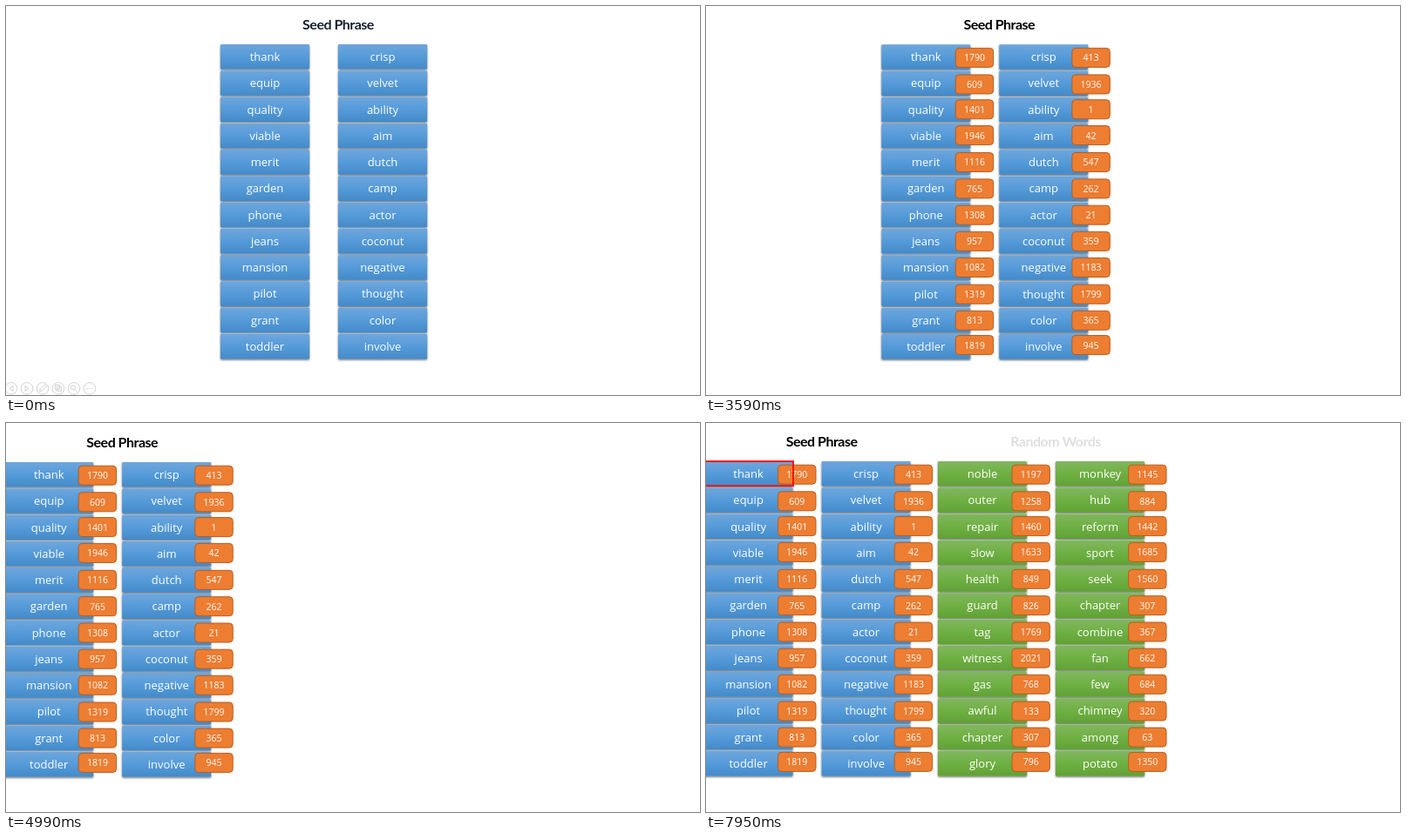
These frames come from a looping animation (796 by 447 pixels, 8000 ms). An HTML page:

```html
<!DOCTYPE html>
<html lang="en">
<head>
<meta charset="utf-8">
<title>Seed Phrase</title>
<style>
  html, body { margin: 0; width: 100%; height: 100%; overflow: hidden; background: #fff; }
  svg { display: block; width: 796px; height: 447px; }
  text { text-anchor: middle; fill: #fff; }
  .word { font: 13px "Open Sans", "Noto Sans", sans-serif; }
  .num { font: 10.5px "Open Sans", "Noto Sans", sans-serif; }
  .title { font: 700 16px Lato, "Open Sans", sans-serif; letter-spacing: -.5px; fill: #000; }
  .badge rect { fill: #ed7d31; stroke: #b85c1c; }
  #controls { fill: none; stroke: #d2d2d2; }
  #mark { fill: none; stroke: #f00; stroke-width: 2; }
</style>
</head>
<body>
<svg viewBox="0 0 796 447">
  <defs>
    <linearGradient id="blue" x2="0" y2="1">
      <stop offset="0" stop-color="#6fa6dc"/>
      <stop offset=".5" stop-color="#559bd9"/>
      <stop offset="1" stop-color="#448ac8"/>
    </linearGradient>
    <linearGradient id="green" x2="0" y2="1">
      <stop offset="0" stop-color="#81b760"/>
      <stop offset=".5" stop-color="#6fb043"/>
      <stop offset="1" stop-color="#61a136"/>
    </linearGradient>
    <filter id="shadow" filterUnits="userSpaceOnUse" x="-20" y="30" width="840" height="400">
      <feDropShadow dx="0" dy="1.2" stdDeviation="1.1" flood-color="#000" flood-opacity=".62"/>
    </filter>
  </defs>
  <g id="random">
    <text id="randomTitle" class="title" x="401" y="26.6">Random Words</text>
  </g>
  <g id="seed">
    <text id="seedTitle" class="title" x="381" y="26.6">Seed Phrase</text>
  </g>
  <rect id="mark" x="-4" y="44" width="104" height="28.3"/>
  <g id="controls">
    <path d="M8 436.5v6l-4-3z M22 436.5v6l4-3z"/>
    <path d="M38.5 443l1-3 5-5 2 2-5 5z"/>
    <path d="M56.5 435.5h5v5h-5z M58.5 437.5h5v5h-5z"/>
    <circle cx="77" cy="438.5" r="2.6"/>
    <path d="M79 440.5l3 3"/>
    <path d="M92.5 439.5h1.5 M95.3 439.5h1.5 M98 439.5h1.5"/>
  </g>
</svg>
<script>
const LOOP = 8000, STEP = 76, PITCH = 30.26;
const badgeMid = [59.2, 89.8, 118.6, 148.4, 179.3, 209.7, 240, 270.2, 300.3, 331, 361.1, 389.4];
const seedWords = `thank 1790 equip 609 quality 1401 viable 1946 merit 1116 garden 765
  phone 1308 jeans 957 mansion 1082 pilot 1319 grant 813 toddler 1819
  crisp 413 velvet 1936 ability 1 aim 42 dutch 547 camp 262
  actor 21 coconut 359 negative 1183 thought 1799 color 365 involve 945`;
const randomWords = `noble 1197 outer 1258 repair 1460 slow 1633 health 849 guard 826
  tag 1769 witness 2021 gas 768 awful 133 chapter 307 glory 796
  monkey 1145 hub 884 reform 1442 sport 1685 seek 1560 chapter 307
  combine 367 fan 662 few 684 chimney 320 among 63 potato 1350`;

const $ = id => document.getElementById(id);

function add(parent, tag, attrs = {}, text = "") {
  const el = document.createElementNS("http://www.w3.org/2000/svg", tag);
  for (const key in attrs) el.setAttribute(key, attrs[key]);
  el.textContent = text;
  return parent.appendChild(el);
}

// Two columns of twelve words, each with a number badge on its right edge.
function buildTable(parent, list, left, fill) {
  const words = add(parent, "g");
  const boxes = add(words, "g", { filter: "url(#shadow)" });
  const badges = add(parent, "g");
  const items = list.split(/\s+/);
  for (let i = 0; i < 24; i++) {
    const col = Math.floor(i / 12), row = i % 12;
    const x = left + col * 135, y = 44 + row * PITCH;
    add(boxes, "rect", { x, y, width: 102, height: 28.6, rx: 1, fill: `url(#${fill})` });
    add(words, "text", { class: "word", x: x + 51, y: y + 19 }, items[2 * i]);
    const mid = x + 106.7 - col * 1.4, cy = badgeMid[row];
    const badge = add(badges, "g", { class: "badge" });
    add(badge, "rect", { x: mid - 21.7, y: cy - 11, width: 43.4, height: 22, rx: 4 });
    add(badge, "text", { class: "num", x: mid, y: cy + 4 }, items[2 * i + 1]);
  }
  return { words, badges };
}

const seed = buildTable($("seed"), seedWords, 246, "blue");
const random = buildTable($("random"), randomWords, 266, "green");
for (let i = 0; i < 6; i++) add($("controls"), "circle", { cx: 6 + 18 * i, cy: 439.5, r: 6.8 });

const clamp = v => Math.min(1, Math.max(0, v));
const ease = u => u < .5 ? 2 * u * u : 1 - 2 * (1 - u) ** 2;
// Motion advances in even ticks, counted from the start of each phase.
const ticks = (t, start) => Math.floor((t - start + 6) / STEP);
const fade = (el, alpha) => { el.style.opacity = alpha; };

function draw(t) {
  const started = t >= 500;
  $("controls").style.display = started ? "none" : "";
  $("seedTitle").style.fill = started ? "#000" : "#17232d";

  const shown = started ? 1 + Math.floor(ticks(t, 500) * 1.45) : 0;
  [...seed.badges.children].forEach((b, i) => { b.style.display = i < shown ? "" : "none"; });

  const slide = ease(clamp((ticks(t, 2980) - 1.22) / 22.57));
  const [dx, dy] = t < 5860 ? [-247.8 * slide, slide] : [-248.4, 0];
  $("seed").setAttribute("transform", `translate(${dx} ${dy})`);

  const k = t < 5860 ? -1 : ticks(t, 5860);
  const out = t < 7560 ? 0 : clamp((ticks(t, 7560) + .6) / 6.4);
  const green = clamp((k - 6.2) / 6.5);
  fade($("randomTitle"), clamp((k + .4) / 6.4) * (1 - out));
  fade(random.words, green);
  fade(random.badges, green);
  fade($("mark"), out);
}

function frame() {
  draw(performance.now() % LOOP);
  requestAnimationFrame(frame);
}
frame();
</script>
</body>
</html>
```
